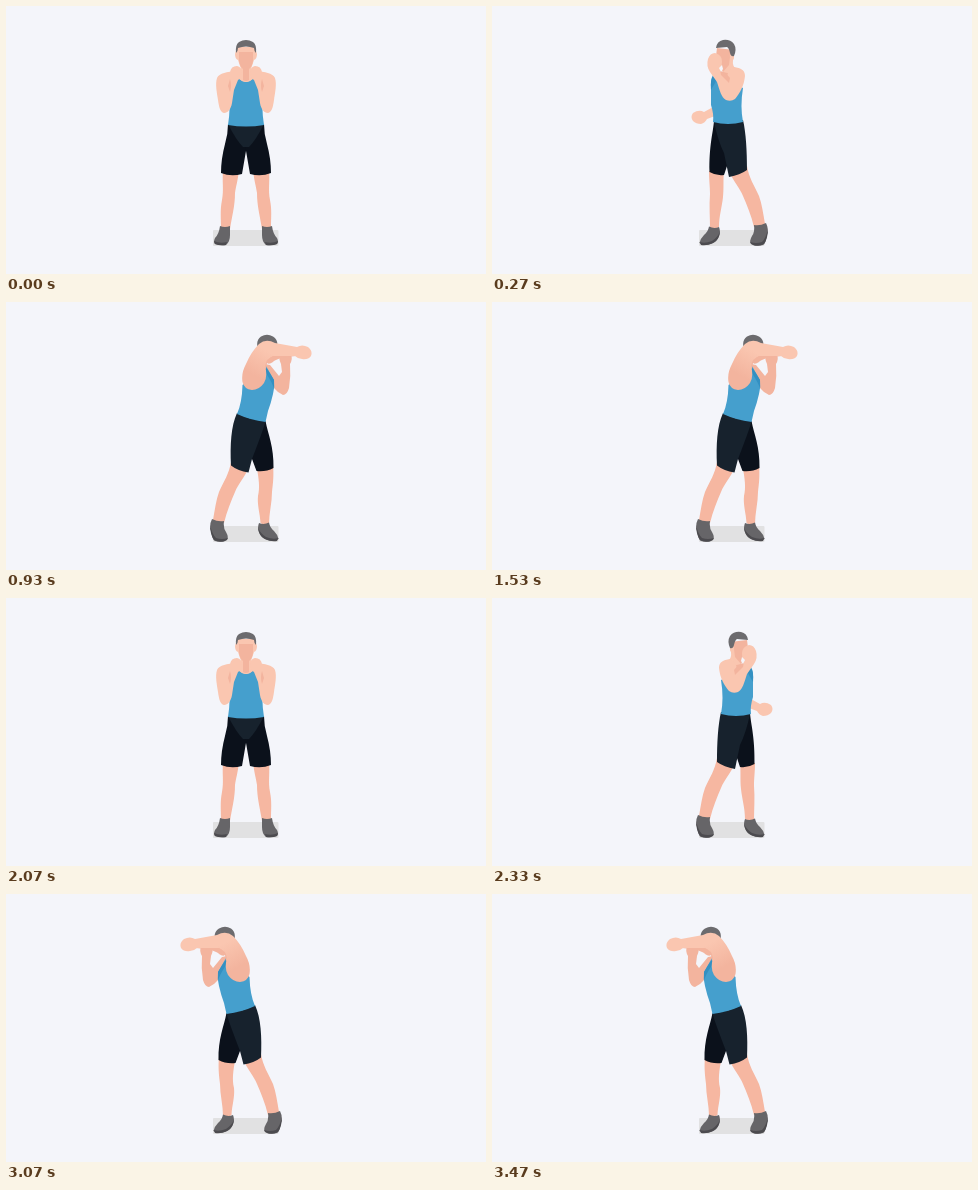
An HTML page that plays this animation: 480x268 px, repeating every 3740 ms.

```html
<!DOCTYPE html>
<html lang="en">
<head>
<meta charset="utf-8">
<title>Standing elbow strikes</title>
<style>
  html, body { margin: 0; width: 100%; height: 100%; overflow: hidden; background: #f4f5fa; }
  svg { display: block; width: 100%; height: 100%; }
  .skin { fill: #fac6b0; }
  .shade { fill: #f3b49e; }
  .leg { fill: #f6b7a1; }
  .hair { fill: #6c6b6e; }
  .top { fill: #459fcd; }
  .strap { fill: #3390c2; }
  .near { fill: #17222d; }
  .far { fill: #0b111b; }
  .shoe { fill: #666568; }
  .sole { fill: #4c4b4f; }
  .gap { fill: #f4f5fa; }

  /* Every pose is held, then cut hard to the next. */
  .pose { visibility: hidden; animation: 3740ms step-end infinite; }
  .guard { animation-name: guard; }
  .wind-left { animation-name: wind-left; }
  .strike-right { animation-name: strike-right; }
  .wind-right { animation-name: wind-right; }
  .strike-left { animation-name: strike-left; }
  @keyframes guard {
    0%, 44.652% { visibility: visible; }
    7.219%, 62.299%, 100% { visibility: hidden; }
  }
  @keyframes wind-left {
    0%, 24.866%, 100% { visibility: hidden; }
    7.219% { visibility: visible; }
  }
  @keyframes strike-right {
    0%, 44.652%, 100% { visibility: hidden; }
    24.866% { visibility: visible; }
  }
  @keyframes wind-right {
    0%, 82.085%, 100% { visibility: hidden; }
    62.299% { visibility: visible; }
  }
  @keyframes strike-left {
    0%, 100% { visibility: hidden; }
    82.085% { visibility: visible; }
  }
</style>
</head>
<body>
<svg viewBox="0 0 480 268" preserveAspectRatio="none">
  <defs>
    <linearGradient id="shoulder" gradientUnits="userSpaceOnUse" x1="260" y1="48" x2="246" y2="72">
      <stop offset="0" stop-color="#fac6b0"/>
      <stop offset="1" stop-color="#f3b49e"/>
    </linearGradient>

    <!-- Left half of the front guard -->
    <g id="half-legs">
      <path class="leg" d="M217 164H233C232 174 230 180 229 187C229 200 226 210 224 223H215C215 211 214 204 216 194C218 184 216 176 217 164Z"/>
      <path class="shoe" d="M214 220Q219 222 224 220L224 229Q224 236 220 239Q214 240 209 238Q207 236 209 232Q213 228 214 220Z"/>
      <path class="sole" d="M208 235Q214 238 221 236L220 239Q214 240 209 238Z"/>
      <path class="far" d="M222 118H240.5V142L236 168Q225 171 215 167Q215 153 219 138Q222 128 222 118Z"/>
    </g>
    <g id="half-arm">
      <path class="skin" d="M229 65C222 66 213 67 211 72C209 78 211 87 212 94C213 101 214 106 218 107C222 107 225 103 226 97L228 84L232 74Q236 72 236 67Q236 61 231 60Q225 60 224 66Z"/>
      <path class="shade" d="M224 73Q226 79 224 86L222 80Z"/>
    </g>

    <g id="shoes">
      <path class="shoe" d="M206 217Q212 220 218 219Q217 226 220 230Q223 235 221 238Q215 241 209 239Q206 237 205 229Q203 223 206 217Z"/>
      <path class="sole" d="M204 223Q206 232 210 236Q216 238 222 236Q221 239 218 239.5Q212 240.5 208 238Q204 232 204 223Z"/>
      <path class="shoe" d="M253 221Q258 223 263 220.5Q264 226 268 229Q272 233 272.5 237Q268 240 261 238Q254 235 253 230Q251 226 253 221Z"/>
      <path class="sole" d="M252 226Q255 232 260 235Q267 238 272.5 236L271 239Q265 240 259 237Q253 234 252 226Z"/>
    </g>
    <path id="back-leg" class="leg" d="M225 160L243 165C239 175 232 182 229 190C225 199 221 209 218 221Q211 222 207 218C209 207 210 198 213 190C218 179 223 172 225 160Z"/>

    <!-- Turned to the right, one fist by the chin -->
    <g id="wind">
      <path class="leg" d="M248 165H263C263 174 262 180 262 188C263 200 262 211 262 222Q257 224 253 221C253 210 250 201 249 191C248 181 249 176 248 165Z"/>
      <use href="#back-leg"/>
      <use href="#shoes"/>
      <path class="far" d="M240 116L258 115C259 127 263 140 262.5 166Q256 170 248 169L244 157Z"/>
      <path class="near" d="M229 114Q245 119 258 116Q254 135 248 147L243 171Q232 169 225 164C225 145 226 127 229 114Z"/>
      <path class="skin" d="M257 100L268 106Q273 103 279 107Q282 111 279 115Q276 118 271 118Q267 117 265 113L257 110Z"/>
      <path class="top" d="M233 80L248 68L258 70Q261 72 261 78Q261 90 261 99Q258 108 259 116Q244 120 229 116Q232 100 229 82Z"/>
      <path class="strap" d="M254 71L259 69Q262 74 261 84L257 77Z"/>
      <path class="shade" d="M238 44L255 42L257 58Q254 64 250 64L247 72L239 66Q241 58 238 50Z"/>
      <path class="skin" d="M238 47Q243 44 242 51L243 59L249 66L240 68L237 62Q241 57 238 52Z"/>
      <path class="hair" d="M238 50Q235 43 238 38Q242 33 249 34Q255 35 256 42L245 41Q243 42 242 47Q241 51 238 50Z"/>
      <path class="skin" d="M238 61C231 62 227 64 227 70C228 80 232 87 237 93Q241 96 246 94C251 91 252 85 255 76L262 66Q266 60 264 53Q262 47 257 47Q250 49 250 55Q250 60 251 66L244 74Q247 65 238 61Z"/>
      <path class="shade" d="M242 72Q245 68 249 66L252 64L251 69L243 77Z"/>
      <path class="gap" d="M250 59L253 62L251 66L249 63Z"/>
    </g>

    <!-- Elbow thrown to the right -->
    <g id="strike">
      <path class="leg" d="M250.5 164L267 163C268 174 267 181 266 190C266 201 263 211 263 222Q258 224 254.5 221C254 211 251 203 252 194C254 185 253 178 250.5 164Z"/>
      <use href="#back-leg"/>
      <use href="#shoes"/>
      <path class="far" d="M244 115L259.5 119C262 132 268 145 267.5 166Q260 170 250.5 169L246 157Z"/>
      <path class="near" d="M231 111Q245 118 259.5 120Q255 134 246 157L242.5 170.5Q232 169 225 163.5C224 143 225 124 231 111Z"/>
      <path class="shade" d="M259 62L264 63L273 74L276 70L275 62Q272 56 275 52Q280 49 285 53Q287 57 284 62Q285 74 283 86Q281 93 277 93Q272 91 268 86Z"/>
      <path class="top" d="M257 66L260 64Q264 71 268 78Q269 85 267 92Q265 101 262 109L259.5 120Q244 118 231 112Q236 101 236.5 83Z"/>
      <path class="strap" d="M259 64Q264 71 268 78L268 86Q264 76 258 69Z"/>
      <path class="shade" d="M254 46H271Q271 56 267 60Q263 63 261 61L260 67L250 62Z"/>
      <path class="hair" d="M251.5 45Q250 38 255 34.5Q261 31 267 34.5Q271.5 37 271.5 43L262 46Z"/>
      <path fill="url(#shoulder)" d="M253 42Q260 36 269 41L291 45Q296 42 302 45Q307 49 305 54Q302 58 296 57Q292 57 289 54L268 54Q260 56 259 64Q262 74 258 81Q253 88 246 88Q238 87 236.5 80Q235 71 240 62Q245 50 253 42Z"/>
      <path class="shade" d="M267 54L290 54L276 55.5L270 58L263 61Q262 56 267 54Z"/>
    </g>
  </defs>

  <rect width="480" height="268" fill="#f4f5fa"/>
  <rect x="207" y="224" width="65.5" height="16" rx="1" fill="#e1e1e2"/>

  <g class="pose guard">
    <use href="#half-legs"/>
    <use href="#half-legs" transform="matrix(-1 0 0 1 480 0)"/>
    <path class="near" d="M222 118H258Q250 134 243 141H237Q230 134 222 118Z"/>
    <path class="skin" d="M226 66H254L258 82H222Z"/>
    <path class="top" d="M228 73H234Q236 76 240 76Q244 76 246 73H252Q253 84 258 89Q255 101 258 119Q240 122 222 119Q225 101 222 89Q227 84 228 73Z"/>
    <path class="skin" d="M231 41H249L251 48Q251 53 248 54Q246 60 245 63L247 73Q240 79 233 73L235 63Q234 60 232 54Q229 53 229 48Z"/>
    <path class="shade" d="M233 46H247V55Q246 61 243 63V74Q240 76 237 74V63Q234 61 233 55Z"/>
    <path class="hair" d="M230 47Q229 39 233 36Q240 32 247 36Q251 39 250 47Q248 45 248 42Q240 39 232 42Q232 45 230 47Z"/>
    <use href="#half-arm"/>
    <use href="#half-arm" transform="matrix(-1 0 0 1 480 0)"/>
  </g>
  <use class="pose wind-left" href="#wind" transform="matrix(-1 0 0 1 480 0)"/>
  <use class="pose strike-right" href="#strike"/>
  <use class="pose wind-right" href="#wind"/>
  <use class="pose strike-left" href="#strike" transform="matrix(-1 0 0 1 480 0)"/>
</svg>
</body>
</html>
```
